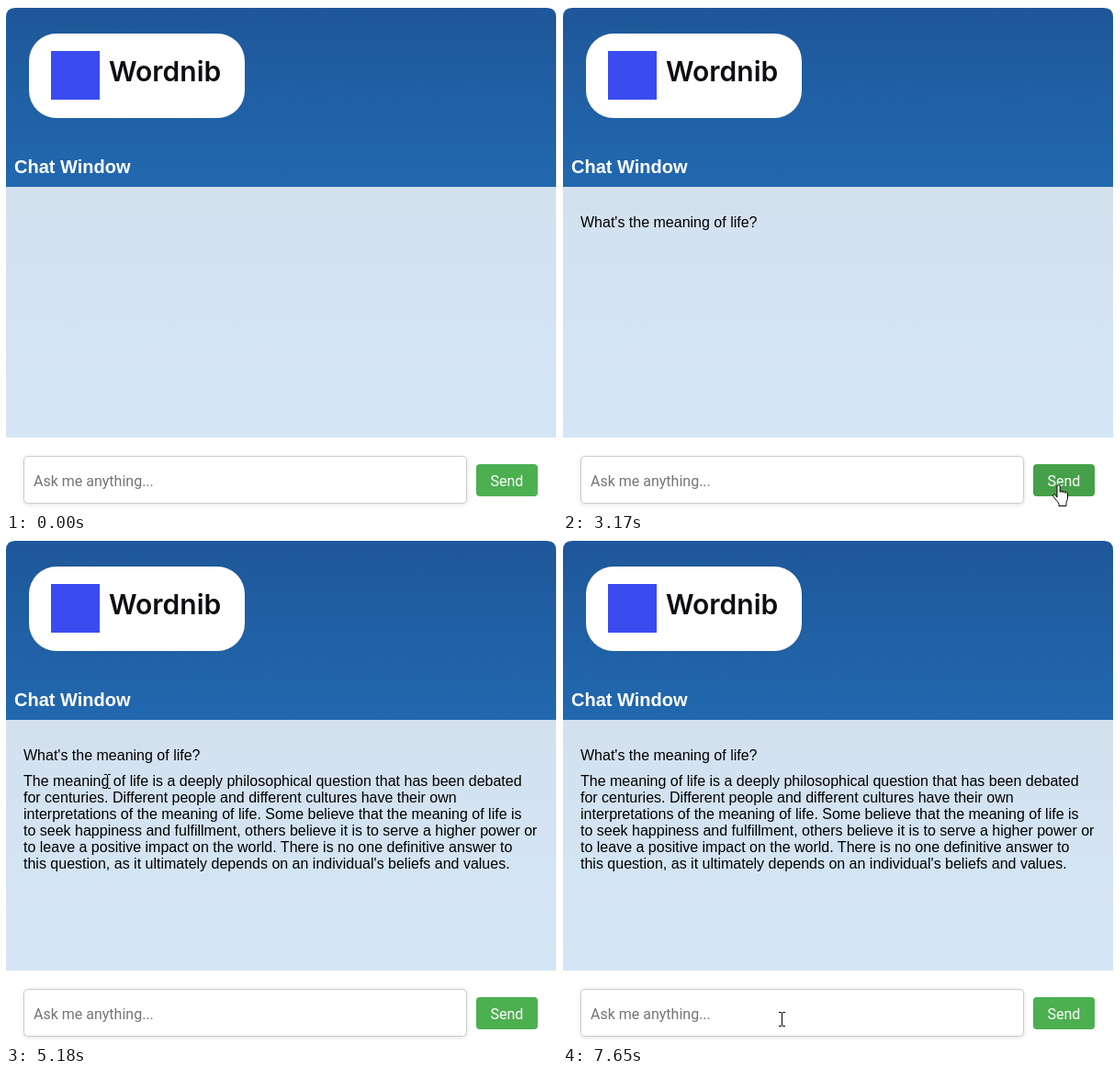
Write an HTML page that moves like this. It is 600 px wide and 550 px high and loops after 8 s.

```html
<!DOCTYPE html>
<html lang="en">
<head>
<meta charset="utf-8">
<title>Chat window</title>
<style>
  html, body { margin: 0; width: 100%; height: 100%; overflow: hidden; background: #fff; }
  svg { display: block; width: 600px; height: 550px; }
  .chat { font: 16px "Liberation Sans", Arial, sans-serif; }
  .ui { font: 16px Roboto, sans-serif; }
  .title { font: bold 20px "Liberation Sans", Arial, sans-serif; fill: #fff; }
  .brand { font: 600 30px Inter, sans-serif; fill: #0d0d12; }
  .crisp { shape-rendering: crispEdges; }
  #input { fill: #fff; stroke: #ccc; filter: drop-shadow(0 1px 2px rgba(0, 0, 0, .12)); }
</style>
</head>
<body>
<svg viewBox="0 0 600 550">
  <defs>
    <linearGradient id="blue" gradientUnits="userSpaceOnUse" x1="0" y1="2" x2="0" y2="562">
      <stop stop-color="#1e5799"/>
      <stop offset="1" stop-color="#2989d8"/>
    </linearGradient>
  </defs>

  <path d="M0 470V12Q0 2 10 2H589Q599 2 599 12V470Z" fill="url(#blue)"/>
  <rect y="197" width="599" height="273" fill="#fff" fill-opacity=".8"/>

  <rect x="25" y="30" width="235" height="92" rx="30" fill="#fff"/>
  <rect x="49" y="49" width="53" height="53" fill="#3a4cf0"/>
  <text class="brand" x="112" y="82">Wordnib</text>
  <text class="title" x="9" y="182">Chat Window</text>

  <text class="chat" id="question" x="19" y="241">What's the meaning of life?</text>
  <text class="chat" id="answer"></text>

  <rect id="input" x="19.5" y="490.5" width="482" height="51" rx="4"/>
  <text class="ui" id="field" x="30" y="523"></text>
  <rect class="crisp" id="caret" y="508" width="1" height="18"/>
  <rect id="button" x="512" y="499" width="67" height="35" rx="4"/>
  <text class="ui" x="527.5" y="523" fill="#fff">Send</text>

  <g id="cursor">
    <path id="arrow" d="M.5 .5V16.6L4.2 13.1 6.7 18.6 9 17.6 6.6 12.2H11.7Z" fill="#fff" stroke="#000"/>
    <path id="beam" class="crisp" d="M-4-8h3v1h-3zM0-8h3v1H0zM-1-7H0V7H-1zM-4 7h3v1h-3zM0 7h3v1H0z"/>
    <path id="hand" transform="translate(-5 -1)" fill="#fff" stroke="#000"
      d="M5 14V2.2a1.6 1.6 0 0 1 3.2 0V8.5a1.5 1.5 0 0 1 3 .4 1.4 1.4 0 0 1 2.8 .6 1.3 1.3 0 0 1 2.5 .7V15c0 2-1.5 3.5-1.5 5.5V23.5H7v-2C6 18.5 2.5 16 .8 12.8c-.6-1.6 1.2-2.4 2.4-1.2Z"/>
  </g>
</svg>
<script>
const LOOP = 8000, STEP = 200 / 3, PHASE = 38;
const QUESTION = "What's the meaning of life?";
const ANSWER = [
  "The meaning of life is a deeply philosophical question that has been debated",
  "for centuries. Different people and different cultures have their own",
  "interpretations of the meaning of life. Some believe that the meaning of life is",
  "to seek happiness and fulfillment, others believe it is to serve a higher power or",
  "to leave a positive impact on the world. There is no one definitive answer to",
  "this question, as it ultimately depends on an individual's beliefs and values."
];
const ENTER = 430, PASTE = 1500, SEND = 3030, REPLY = 4630;

const linear = u => u;
const smooth = u => u * u * (3 - 2 * u);
const easeOut = u => 1 - (1 - u) ** 2;

// Pointer path: time, x, y, easing towards that point
const PATH = [
  [ENTER, 165, 545],
  [771, 96, 516, easeOut],
  [1772, 96, 516, linear],
  [2238, 538, 522, smooth],
  [3838, 538, 522, linear],
  [4571, 122, 263, smooth],
  [4705, 107, 260, easeOut],
  [5105, 107, 260, linear],
  [5171, 111, 264, linear],
  [5972, 330, 298, smooth],
  [6371, 513, 345, smooth],
  [6505, 502, 358, linear],
  [6838, 239, 523, easeOut]
];

const $ = id => document.getElementById(id);
const show = (id, on) => $(id).setAttribute("display", on ? "inline" : "none");
const within = (v, from, to) => v >= from && v < to;

$("answer").innerHTML = ANSWER
  .map((line, i) => `<tspan x="19" y="${269 + 18 * i}">${line}</tspan>`).join("");

function pointerAt(t) {
  const next = PATH.findIndex(key => key[0] > t);
  if (next < 1) return (next ? PATH[PATH.length - 1] : PATH[0]).slice(1, 3);
  const [t0, x0, y0] = PATH[next - 1], [t1, x1, y1, ease] = PATH[next];
  const u = ease((t - t0) / (t1 - t0));
  return [Math.round(x0 + (x1 - x0) * u), Math.round(y0 + (y1 - y0) * u)];
}

function cursorFor(x, y, t) {
  if (within(x, 512, 579) && within(y, 499, 534)) return "hand";
  const overInput = within(x, 19, 502) && within(y, 490, 542);
  const overText = within(x, 19, 579) &&
    (t >= SEND && within(y, 227, 245) || t >= REPLY && within(y, 254, 364));
  return overInput || overText ? "beam" : "arrow";
}

function draw(time) {
  const t = Math.floor((time - PHASE) / STEP) * STEP + PHASE;
  const typed = within(t, PASTE, SEND);
  const [x, y] = pointerAt(t);
  const kind = cursorFor(x, y, t);

  show("question", t >= SEND);
  show("answer", t >= REPLY);
  $("field").textContent = typed ? QUESTION : "Ask me anything...";
  $("field").setAttribute("fill", typed ? "#000" : "#757575");

  show("caret", within(t, 965, 2030) || within(t, 2565, SEND) || within(t, 7035, 7630));
  $("caret").setAttribute("x", typed ? 223 : 30);

  show("cursor", t >= ENTER);
  $("cursor").setAttribute("transform", `translate(${x} ${y})`);
  for (const id of ["arrow", "beam", "hand"]) show(id, id === kind);
  $("button").setAttribute("fill", kind === "hand" ? "#45a049" : "#4caf50");
}

function tick() {
  draw(performance.now() % LOOP);
  requestAnimationFrame(tick);
}
tick();
</script>
</body>
</html>
```
